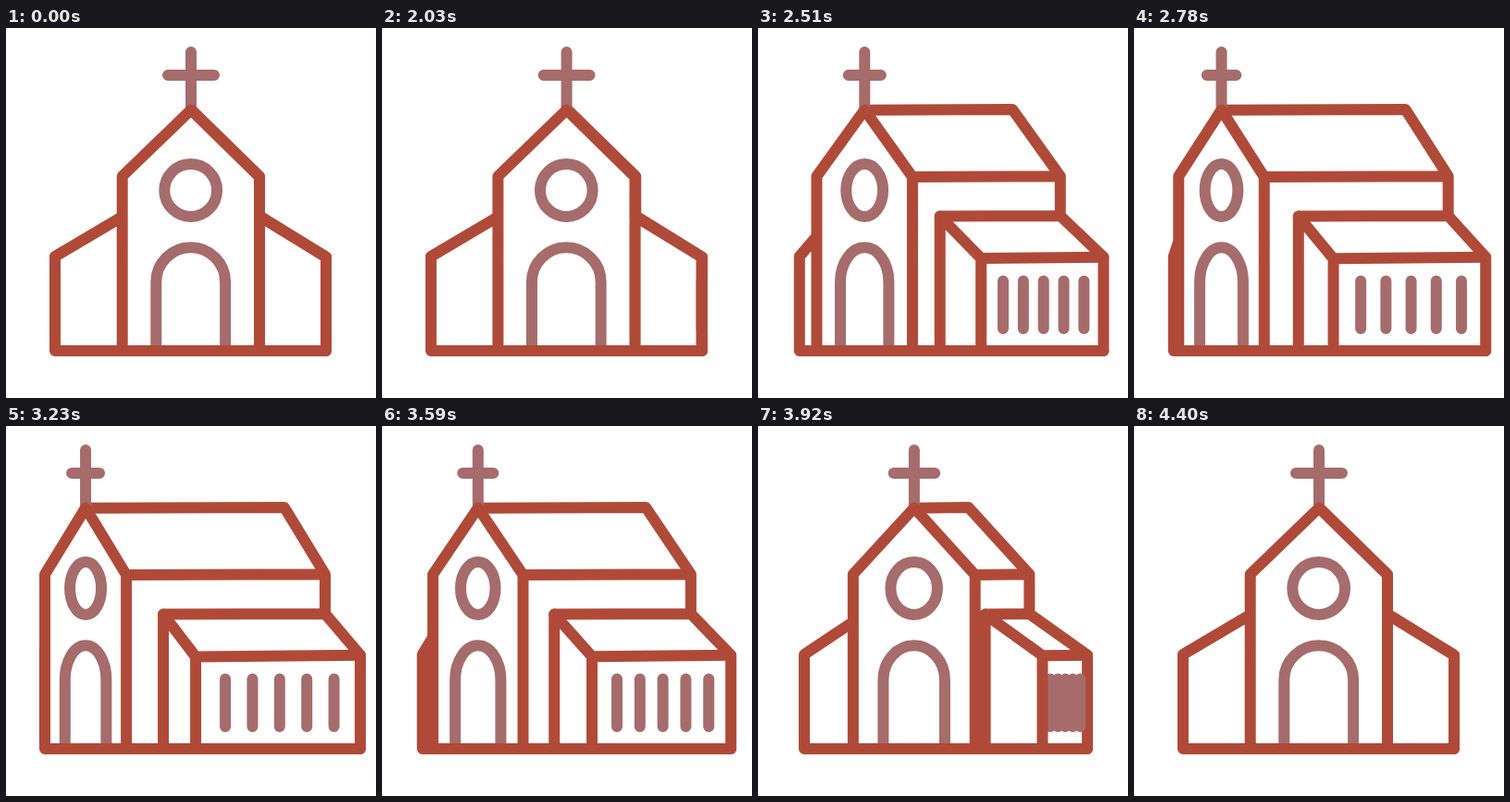
An HTML page that plays this animation: 400 px wide and 400 px high, repeating every 4430 ms.

```html
<!DOCTYPE html>
<html lang="en">
<head>
<meta charset="utf-8">
<title>Turning church</title>
<style>
html, body { margin: 0; width: 100%; height: 100%; overflow: hidden; background: #fff; }
svg { display: block; width: 100vw; height: 100vh; }
path { fill: none; stroke-width: 12; stroke-linecap: round; stroke-linejoin: round; }
.main { stroke: #b04a38; }
.soft { stroke: #a56c6b; }
</style>
</head>
<body>
<svg viewBox="0 0 400 400">
  <path id="side" class="main"/>
  <path id="windows" class="soft"/>
  <path id="details" class="soft"/>
  <path id="front" class="main"/>
</svg>
<script>
const LOOP = 4430, START = 2000, TURN = 3200, END = 4400, STEP = 30;
const BASE = 349;
const el = id => document.getElementById(id);
const parts = { side: el('side'), windows: el('windows'), details: el('details'), front: el('front') };

// Cubic bezier easing with control points (x1, 0) and (x2, 1)
function ease(x, x1, x2) {
  if (x <= 0) return 0;
  if (x >= 1) return 1;
  let lo = 0, hi = 1;
  for (let i = 0; i < 30; i++) {
    const s = (lo + hi) / 2, r = 1 - s;
    const bx = 3 * s * r * r * x1 + 3 * s * s * r * x2 + s * s * s;
    if (bx < x) lo = s; else hi = s;
  }
  return lo * lo * (3 - 2 * lo);
}

// 0 = front view, 1 = fully turned
function turnAt(t) {
  if (t < START) return 0;
  t = START + Math.floor((t - START) / STEP) * STEP;
  return t < TURN
    ? ease((t - START) / (TURN - START), 0.25, 0.16)
    : 1 - ease((t - TURN) / (END - TURN), 0.6, 0.4);
}

const line = (...pts) => 'M' + pts.map(p => p[0].toFixed(2) + ' ' + p[1].toFixed(2)).join('L');

function draw(t) {
  const u = turnAt(t);
  const mix = (a, b) => a + (b - a) * u;

  const apex = mix(200, 86);
  const wallL = mix(125.7, 42), wallR = mix(274, 130);
  const backApex = mix(200, 301), backWall = mix(274, 345);
  const wingL = mix(53, 42), wingIn = mix(274, 170);
  const wingR = mix(346, 205), wingBack = mix(346, 383);

  parts.side.setAttribute('d',
    line([apex, 88.7], [backApex, 88], [backWall, 160.3], [wallR, 161]) +
    line([backWall, 160.3], [backWall, 203]) +
    line([wingIn, 203.4], [backWall, 203], [wingBack, 247.7], [wingBack, BASE]));

  let d = '';
  for (let i = 0; i < 5; i++) {
    const x = mix(346, 237 + i * 29.4);
    d += line([x, 273.5], [x, 325]);
  }
  parts.windows.setAttribute('d', d);

  const mid = mix(199.7, 86), arm = mix(25, 15);
  const rx = mix(28.4, 17), ry = 28.4, door = mix(37.4, 22.3);
  parts.details.setAttribute('d',
    line([apex, 26], [apex, 86]) +
    line([apex - arm, 51], [apex + arm, 51]) +
    `M${mid - rx} 175.5a${rx} ${ry} 0 1 1 ${2 * rx} 0a${rx} ${ry} 0 1 1 ${-2 * rx} 0Z` +
    `M${mid - door} ${BASE - 2}V274.5a${door} 37.2 0 0 1 ${2 * door} 0V${BASE - 2}`);

  parts.front.setAttribute('d',
    line([wallL, BASE], [wallL, 160.3], [apex, 88.5], [wallR, 161], [wallR, BASE]) +
    line([mix(125.7, 42), mix(204, 232.5)], [wingL, 247], [wingL, BASE], [wingBack, BASE]) +
    line([wingIn, BASE], [wingIn, 203.6], [wingR, mix(247.7, 249.5)], [wingR, BASE]) +
    line([wingR, mix(247.7, 249.5)], [wingBack, 247.7]));
}

let origin = null;
function tick(now) {
  if (origin === null) origin = now;
  draw((now - origin) % LOOP);
  requestAnimationFrame(tick);
}
draw(0);
requestAnimationFrame(tick);
</script>
</body>
</html>
```
